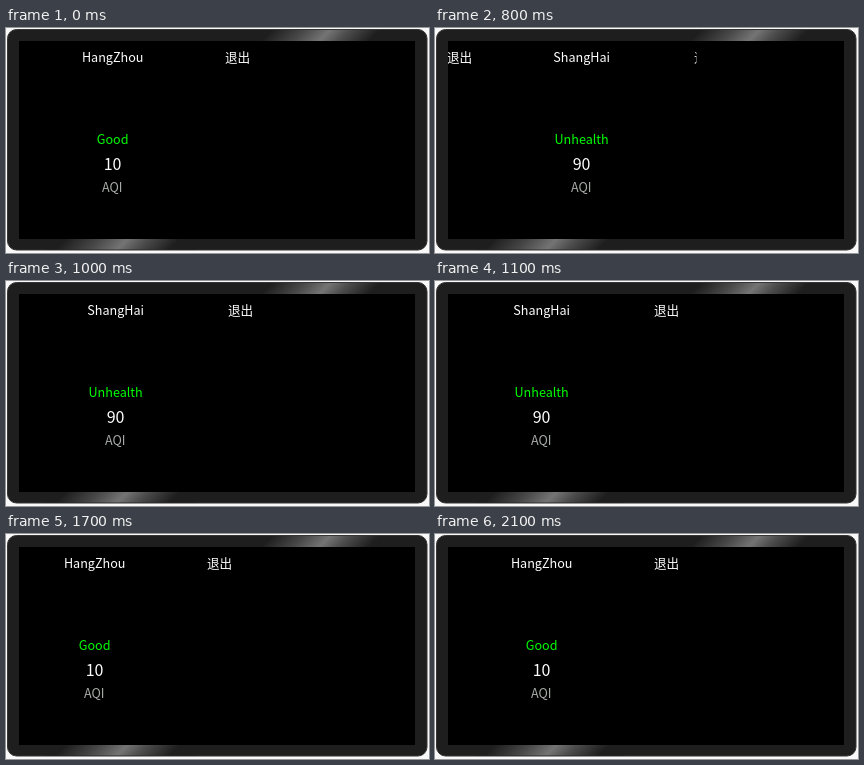
Animation of 423x225 px, one loop 2.7 s. Source, as an HTML page:

```html
<!DOCTYPE html>
<html lang="zh-CN">
<meta charset="utf-8">
<style>
html, body { margin: 0; width: 100%; height: 100%; overflow: hidden; background: #f9f9f9; }
svg { display: block; width: 100%; height: 100%; }
text { font: 12.6px "Noto Sans CJK SC", "Noto Sans CJK", "Noto Sans", sans-serif; fill: #fff; text-anchor: middle; }
.level { fill: #0f0; }
.value { font-size: 16px; }
.unit { fill: #a8aca8; }
</style>
<svg viewBox="0 0 423 225">
  <defs>
    <linearGradient id="topShine" gradientUnits="userSpaceOnUse" x1="260" y1="8" x2="314" y2="62">
      <stop stop-color="#1e1e1e"/>
      <stop offset=".3" stop-color="#484848"/>
      <stop offset=".54" stop-color="#747474"/>
      <stop offset=".72" stop-color="#4c4c4c"/>
      <stop offset="1" stop-color="#1e1e1e"/>
    </linearGradient>
    <linearGradient id="bottomShine" href="#topShine" gradientUnits="userSpaceOnUse" x1="54" y1="217" x2="111" y2="274"/>
    <clipPath id="view"><rect x="13" y="13" width="248.5" height="198"/></clipPath>
  </defs>
  <rect x="1.5" y="1.5" width="419.5" height="220.5" rx="9" fill="#1e1e1e" stroke="#353535"/>
  <rect x="240" y="2" width="150" height="11" fill="url(#topShine)"/>
  <rect x="40" y="211" width="150" height="10.5" fill="url(#bottomShine)"/>
  <rect x="13" y="13" width="396" height="198" fill="#000"/>
  <g clip-path="url(#view)"><g id="strip"></g></g>
</svg>
<script>
const LOOP = 2700, PAGE = 247;
const pages = [["HangZhou", "Good", 10], ["ShangHai", "Unhealth", 90]];
// [time in ms, strip offset]: the display refreshes every 100 ms while sliding
const steps = [
  [0, 0], [700, 116], [800, 207], [900, 235], [1000, 244], [1100, PAGE],
  [1600, 160], [1700, 18], [1800, 4], [1900, 1], [2000, 0]
];
const strip = document.getElementById("strip");

strip.innerHTML = pages.map(([city, level, value], i) => `
  <g transform="translate(${i * PAGE})">
    <text x="106.7" y="33.6">${city}</text>
    <text x="231.6" y="33.6">退出</text>
    <text x="106.6" y="116.3" class="level">${level}</text>
    <text x="106.6" y="142.3" class="value">${value}</text>
    <text x="106.2" y="163.8" class="unit">AQI</text>
  </g>`).join("");

function draw() {
  const time = performance.now() % LOOP;
  const [, offset] = steps.findLast(([start]) => start <= time);
  strip.setAttribute("transform", `translate(${-offset})`);
  requestAnimationFrame(draw);
}
draw();
</script>
</html>
```
